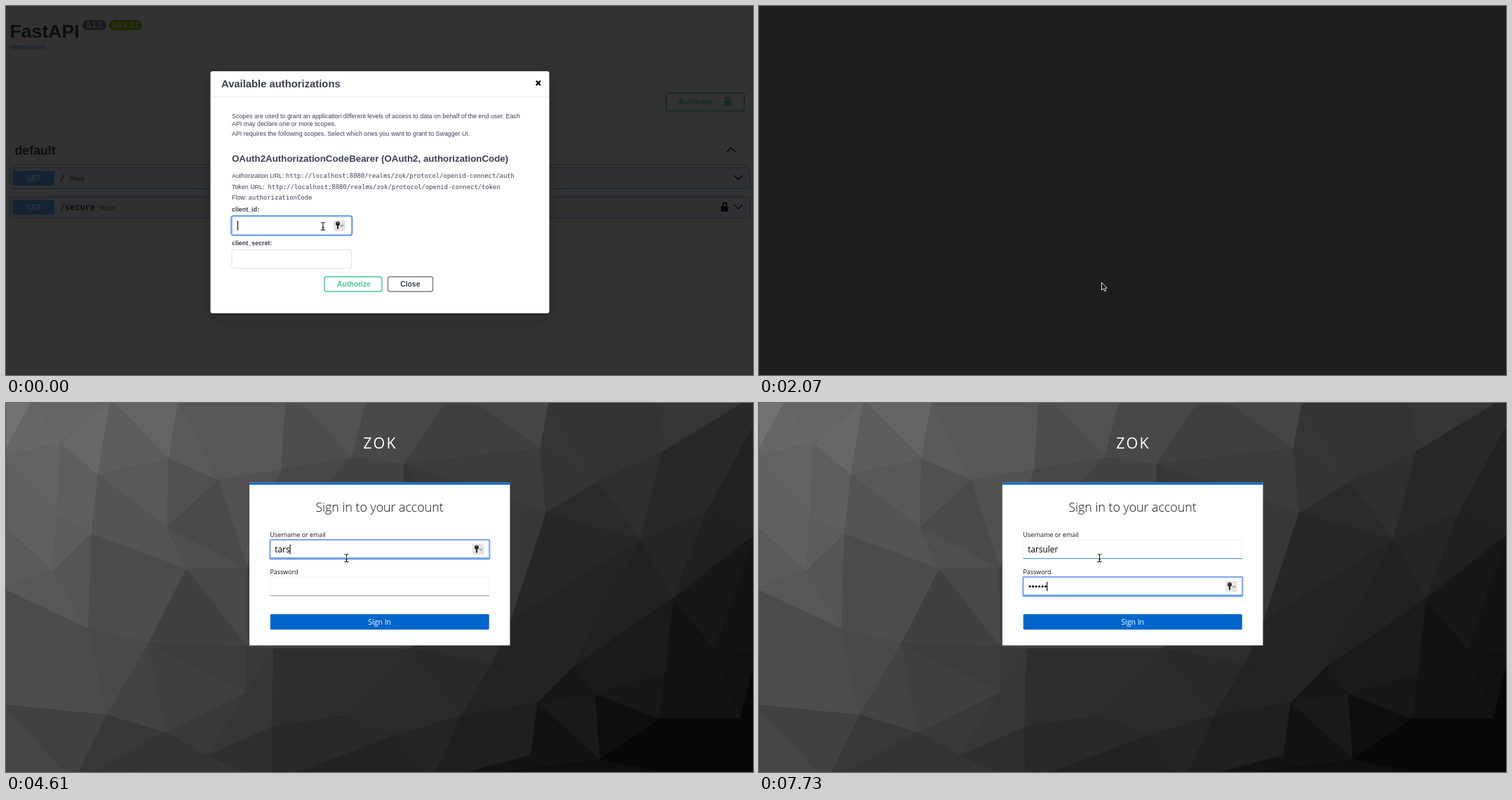
These frames come from a looping animation (1065x526 px, 8 s). An HTML page:

```html
<!DOCTYPE html>
<html lang="en">
<head>
<meta charset="utf-8">
<title>Sign-in flow</title>
<style>
html, body { margin: 0; width: 100%; height: 100%; overflow: hidden; background: #1e1e1e; }
svg { display: block; width: 100vw; height: 100vh; }
text { font: 8.88px "Liberation Sans", Arial, sans-serif; fill: #3b4151; white-space: pre; }
.bold { font-weight: 700; }
.mid { text-anchor: middle; }
.btn { font-size: 10.36px; font-weight: 700; }
.mono { font-family: "DejaVu Sans Mono", monospace; }
.path { font: 700 11.84px "DejaVu Sans Mono", monospace; }
#login text { font-family: "Open Sans", sans-serif; fill: #151515; }
#login .entry { font-size: 11.84px; fill: #000; }
#popup text { font: 500 9.4px Inter, sans-serif; fill: #fff; }
.line { fill: none; stroke: #000; stroke-width: 1.3; }
.field { fill: #fff; stroke: #d9d9d9; stroke-width: .8; }
.ring { fill: none; stroke: #7ba7f3; stroke-width: 2.6; }
</style>
</head>
<body>
<svg viewBox="0 0 1065 526" preserveAspectRatio="none">
  <defs>
    <g id="lock"><rect x="-5" y="-1" width="10" height="7.5" rx="1"/><path d="M-2.6-1V-3.2a2.7 2.7 0 0 1 5.4 0V-1" fill="none" stroke="currentColor" stroke-width="1.6"/></g>
    <g id="key">
      <rect x="-8.5" y="-8" width="17" height="16" rx="3" fill="#e4e4e4"/>
      <circle cx="-2" cy="-2.7" r="3" fill="#222"/><path d="M-2-1V5" stroke="#222" stroke-width="2"/>
      <circle cx="-2" cy="-3.8" r=".7" fill="#e4e4e4"/>
      <path d="M2.2-.8L4.2 1.2 6.2-.8" fill="none" stroke="#444"/>
    </g>
    <g id="arrow"><path d="M0 0V11.2L2.6 8.8 4.4 12.6 6.2 11.8 4.5 8.1H7.7Z" fill="#111" stroke="#fff" stroke-width=".9"/></g>
    <g id="beam" fill="none">
      <path id="stem" d="M-3-5.5Q0-5.5 0-4V4Q0 5.5-3 5.5M3-5.5Q0-5.5 0-4M0 4Q0 5.5 3 5.5M-1.5 1.5H1.5" stroke="#fff" stroke-width="2.2"/>
      <use href="#stem" /><path d="M-3-5.5Q0-5.5 0-4V4Q0 5.5-3 5.5M3-5.5Q0-5.5 0-4M0 4Q0 5.5 3 5.5M-1.5 1.5H1.5" stroke="#111" stroke-width="1.1"/>
    </g>
    <g id="hand"><path d="M-2.5 1.5V-5a1.2 1.2 0 0 1 2.4 0V-1.2Q1.8-2 2-.7 3.6-1.3 3.8 0 5.4-.2 5.4 1.2V4L4.2 8H-1.6L-5 3Q-5.6 1.2-4 1.2Z" fill="#fff" stroke="#111"/><path d="M.4 2.5V5.5M2.4 2.5V5.5" stroke="#111" stroke-width=".7"/></g>
  </defs>

  <g id="docs">
    <rect width="1065" height="526" fill="#fafafa"/>
    <path d="M0 173.5H1065" stroke="#ddd"/>
    <text class="bold" x="5.5" y="44.5" style="font-size:26.64px">FastAPI</text>
    <rect x="109" y="20" width="34" height="14.5" rx="7.2" fill="#7d8492"/>
    <rect x="147" y="20" width="46" height="14.5" rx="7.2" fill="#89bf04"/>
    <text class="btn mid" x="126" y="31" style="fill:#fff">0.1.0</text>
    <text class="btn mid" x="170" y="31" style="fill:#fff">OAS 3.1</text>
    <text x="5" y="61" style="fill:#4990e2">/openapi.json</text>
    <rect x="941" y="124" width="111.5" height="25.5" rx="3" fill="none" stroke="#49cc90" stroke-width="1.5"/>
    <text class="btn" x="959" y="140" style="fill:#49cc90">Authorize</text>
    <use href="#lock" x="1029" y="136" fill="#49cc90" color="#49cc90"/>
    <text class="bold" x="12.5" y="212" style="font-size:17.76px">default</text>
    <path class="line" d="M1028 208L1034 202 1040 208"/>
    <path d="M5 226.5H1060" stroke="#c0c2c7" stroke-width=".8"/>
    <g id="row">
      <rect x="5.5" y="230.5" width="1055" height="30" rx="3" fill="#61affe" fill-opacity=".1" stroke="#61affe" stroke-width=".9"/>
      <rect x="9.5" y="235" width="59.5" height="21" rx="2" fill="#61affe"/>
      <text class="btn mid" x="39.3" y="249" style="fill:#fff">GET</text>
      <path class="line" d="M1038 241.5L1044 247.5 1050 241.5"/>
    </g>
    <use href="#row" y="41.6"/>
    <text class="path" x="77" y="249">/</text><text x="91" y="249" style="font-size:9.9px">Root</text>
    <text class="path" x="77" y="290.6">/secure</text><text x="134" y="290.6" style="font-size:9.9px">Root</text>
    <use href="#lock" x="1024.5" y="286.5" color="#000"/>
    <rect width="1065" height="526" fill-opacity=".8"/>

    <rect x="291.5" y="93" width="483" height="345" rx="3" fill="#fff" style="filter:drop-shadow(0 7px 11px #0003)"/>
    <path d="M292 129.5H774" stroke="#ebebeb"/>
    <text class="bold" x="307" y="116" style="font-size:14.8px">Available authorizations</text>
    <path d="M755.8 106.8L762 113M762 106.8L755.8 113" stroke="#000" stroke-width="2.2"/>
    <text x="322" y="160">Scopes are used to grant an application different levels of access to data on behalf of the end user. Each</text>
    <text x="322" y="170.5">API may declare one or more scopes.</text>
    <text x="322" y="185">API requires the following scopes. Select which ones you want to grant to Swagger UI.</text>
    <text class="bold" x="322" y="222" style="font-size:13.32px">OAuth2AuthorizationCodeBearer (OAuth2, authorizationCode)</text>
    <text x="322" y="244.7">Authorization URL:</text>
    <text class="mono" x="399" y="244.7">http://localhost:8080/realms/zok/protocol/openid-connect/auth</text>
    <text x="322" y="260.5">Token URL:</text>
    <text class="mono" x="373.5" y="260.5">http://localhost:8080/realms/zok/protocol/openid-connect/token</text>
    <text x="322" y="276">Flow:</text>
    <text class="mono" x="345.5" y="276">authorizationCode</text>
    <text class="bold" x="322" y="293">client_id:</text>
    <rect class="field" x="322" y="300" width="170.5" height="26" rx="2.5"/>
    <g id="idFocus"><rect class="ring" x="321.3" y="299.3" width="172" height="27.4" rx="3"/><use href="#key" x="475" y="313"/></g>
    <text id="clientId" x="330" y="317" style="font-size:11.84px;fill:#000"></text>
    <text class="bold" x="322" y="340.7">client_secret:</text>
    <rect class="field" x="322" y="347.5" width="170.5" height="26.5" rx="2.5"/>
    <rect id="pressed" x="453.5" y="386" width="82.5" height="21" rx="3" fill="#fff" style="filter:drop-shadow(0 0 1.5px #49cc90)"/>
    <rect x="454" y="386" width="82" height="21" rx="3" fill="#fff" stroke="#49cc90" stroke-width="1.5"/>
    <text class="btn mid" x="496" y="400" style="fill:#49cc90">Authorize</text>
    <rect x="544.5" y="386" width="64" height="21" rx="3" fill="#fff" stroke="#808080" stroke-width="1.5"/>
    <text class="btn mid" x="576.3" y="400">Close</text>
  </g>

  <g id="login">
    <g id="facets"></g>
    <text class="mid" x="533.5" y="64.7" style="font-size:21.5px;letter-spacing:2.2px;fill:#fff">ZOK</text>
    <rect x="347" y="113.5" width="371.5" height="232" fill="#fff"/>
    <rect x="347" y="113.5" width="371.5" height="3" fill="#06c"/>
    <text class="mid" x="532.5" y="155" style="font-size:17.76px;font-weight:300">Sign in to your account</text>
    <text x="376.5" y="191">Username or email</text>
    <text x="376.5" y="243.7">Password</text>
    <g id="box"><rect x="376.8" y="195.5" width="312" height="26" fill="#fff" stroke="#ededed" stroke-width=".8"/></g>
    <use href="#box" y="53"/>
    <path id="userLine" d="M376.5 221.7H689" stroke="#3a80cf"/>
    <path d="M376.5 274.7H689" stroke="#8a8d90"/>
    <g id="boxFocus">
      <path d="M377 221.3H689" stroke="#06c" stroke-width="1.6"/>
      <rect class="ring" x="376.5" y="195" width="312.8" height="27.4" rx="1" style="stroke-width:2.2"/>
      <use href="#key" x="673" y="208.5"/>
    </g>
    <text id="user" class="entry" x="383.3" y="213"></text>
    <g id="dots"></g>
    <rect x="376.8" y="301" width="312" height="22" rx="1.5" fill="#06c"/>
    <text class="mid" x="532.7" y="315.7" style="font-size:10.5px;fill:#fff">Sign In</text>
    <g id="popup">
      <rect x="371.5" y="277" width="127" height="43" rx="5" fill="#3d5365" stroke="#667887" stroke-width=".7" style="filter:drop-shadow(0 2px 4px #0007)"/>
      <rect x="377" y="281.7" width="116.5" height="16.3" rx="3" fill="#418ee6"/>
      <text x="382" y="293.3">Passwords...</text>
      <text x="382" y="310">Suggest New Password</text>
    </g>
  </g>
  <path id="caret" stroke="#000" stroke-width="1.1"/>
  <use id="pointer"/>
</svg>
<script>
const el = id => document.getElementById(id);
const show = (id, on) => { el(id).style.display = on ? '' : 'none'; };
const LOOP = 8000, NAME = 'tarsuler';

// Low-poly backdrop: Delaunay triangles shaded from light top left to dark bottom right.
const mesh = [[-40,-30],[38,-5],[149,-5],[247,-5],[400,-20],[515,-5],[640,-20],[775,-5],[925,-5],[1100,-30],
  [78,58],[-5,75],[131,103],[232,80],[302,110],[393,95],[493,78],[567,87],[762,65],[842,113],[937,69],
  [73,160],[-5,174],[122,187],[230,178],[343,235],[67,240],[-5,265],[118,322],[203,343],[257,237],
  [770,157],[905,195],[998,157],[1070,185],[720,310],[951,279],[1010,352],[1070,355],[344,348],[344,412],
  [144,445],[-5,430],[97,540],[227,470],[287,503],[379,462],[382,350],[485,445],[575,350],[553,475],
  [693,372],[650,445],[606,540],[810,375],[840,415],[758,428],[748,502],[847,508],[940,386],[932,450],
  [1047,450],[1100,560],[-40,560],[380,540]];

function emptyCircle([ax, ay], [bx, by], [cx, cy]) {
  const d = 2 * (ax * (by - cy) + bx * (cy - ay) + cx * (ay - by));
  if (Math.abs(d) < 1) return false;
  const a = ax * ax + ay * ay, b = bx * bx + by * by, c = cx * cx + cy * cy;
  const x = (a * (by - cy) + b * (cy - ay) + c * (ay - by)) / d;
  const y = (a * (cx - bx) + b * (ax - cx) + c * (bx - ax)) / d;
  const r = Math.hypot(ax - x, ay - y) - 1e-6;
  return mesh.every(p => Math.hypot(p[0] - x, p[1] - y) >= r);
}

let facets = '';
mesh.forEach((a, i) => mesh.slice(i + 1).forEach((b, j) => mesh.slice(i + j + 2).forEach(c => {
  if (!emptyCircle(a, b, c)) return;
  const x = (a[0] + b[0] + c[0]) / 3, y = (a[1] + b[1] + c[1]) / 3;
  const v = Math.max(7, Math.round(111 - .062 * x - .085 * y + 4 * Math.sin(x * 1.7 + y * 2.3)));
  const tone = `rgb(${v},${v},${v})`;
  facets += `<path d="M${a}L${b}L${c}Z" fill="${tone}" stroke="${tone}" stroke-width=".6"/>`;
})));
el('facets').innerHTML = facets;

const passed = (t, times) => times.filter(at => t >= at).length;

// Pointer travel advances in discrete, eased steps.
function travel(t, start, end, steps, [x0, y0], [x1, y1]) {
  const k = Math.min(1, Math.max(0, Math.floor((t - start) / (end - start) * steps + .01) / steps));
  const e = k * k * (3 - 2 * k);
  return [x0 + (x1 - x0) * e, y0 + (y1 - y0) * e];
}

function setPointer(kind, [x, y]) {
  el('pointer').setAttribute('href', '#' + kind);
  el('pointer').setAttribute('transform', `translate(${x} ${y})`);
}

function setCaret(x, y) {
  el('caret').setAttribute('d', `M${x} ${y - 6.8}V${y + 6.8}`);
}

const within = (y, top, bottom) => y >= top && y <= bottom;
const textEnd = id => el(id).getComputedTextLength();

function drawDocs(t) {
  const clicked = t >= 1930;
  el('clientId').textContent = t >= 290 ? 'rns:zok:portal' : '';
  show('idFocus', !clicked);
  show('pressed', clicked);
  show('caret', !clicked);
  show('pointer', t < 290 || t >= 890);
  setCaret(330.5 + textEnd('clientId'), 313);
  const at = travel(t, 890, 1780, 6, [452, 314], [490, 401]), y = at[1];
  setPointer(y > 385 ? 'hand' : within(y, 300, 326) || within(y, 347, 374) ? 'beam' : 'arrow', at);
}

function drawLogin(t) {
  const onPassword = t >= 5800;
  el('user').textContent = NAME.slice(0, passed(t, [3860, 4010, 4310, 4610, 4910, 5060, 5200, 5350]));
  const count = passed(t, [6240, 6540, 6690, 6990, 7440, 7730]);
  el('dots').innerHTML = Array.from({ length: count }, (_, i) =>
    `<circle cx="${386.2 + i * 4.5}" cy="261.5" r="1.6"/>`).join('');
  el('boxFocus').setAttribute('transform', `translate(0 ${onPassword ? 53 : 0})`);
  show('userLine', onPassword);
  show('popup', onPassword && t < 6390);
  el('popup').style.opacity = t < 6240 ? 1 : .4;
  show('caret', true);
  if (onPassword) setCaret(383.8 + count * 4.5, 261.5);
  else setCaret(383.8 + textEnd('user'), 208.8);
  const at = travel(t, 2370, 3270, 6, [479, 357], [485.5, 221]), y = at[1];
  setPointer(within(y, 301, 323) ? 'hand' : within(y, 195, 222) || within(y, 248, 275) ? 'beam' : 'arrow', at);
}

function draw(now) {
  const t = now % LOOP, docs = t < 2070, login = t >= 2370;
  show('docs', docs);
  show('login', login);
  if (docs) drawDocs(t);
  else {
    show('pointer', true);
    if (login) drawLogin(t);
    else {
      show('caret', false);
      setPointer('arrow', [488.5, 394]);
    }
  }
  requestAnimationFrame(draw);
}
requestAnimationFrame(draw);
</script>
</body>
</html>
```
